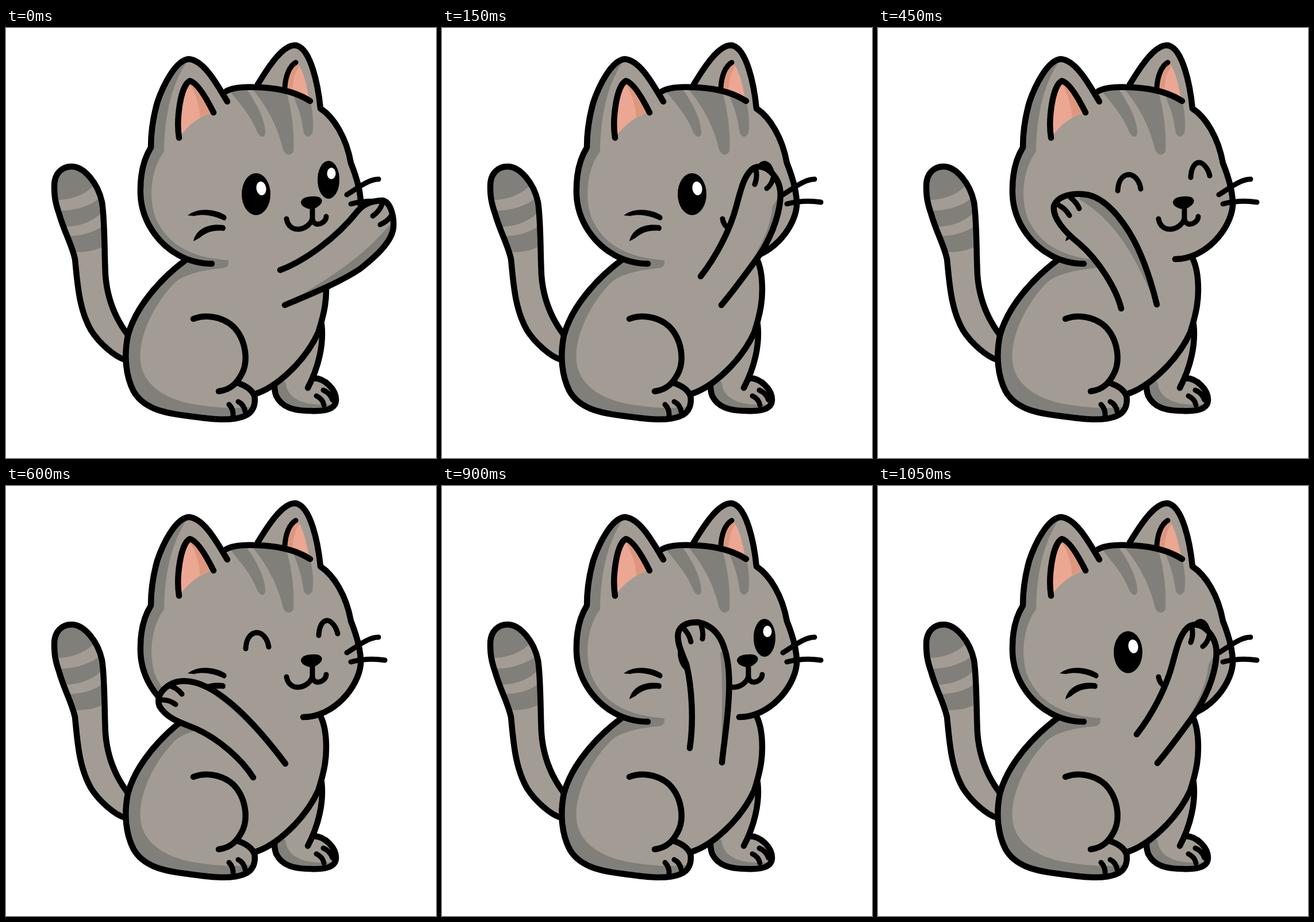
These frames come from a looping animation (748 px wide and 748 px high, 1200 ms). An HTML page:

```html
<!DOCTYPE html>
<html lang="en">
<head>
<meta charset="utf-8">
<title>Waving cat</title>
<style>
  html, body { margin: 0; width: 100%; height: 100%; overflow: hidden; background: #fff; }
  svg { display: block; width: 100%; height: 100%; }
  .fur { fill: #a39c94; }
  .dark { fill: #817f7a; }
  .pink { fill: #eca793; }
  .rose { fill: #de977f; }
  .ink { fill: #000; }
  .line { fill: none; stroke: #000; stroke-width: 10.5; stroke-linecap: round; stroke-linejoin: round; }
  .thin { stroke-width: 9; }
</style>
</head>
<body>
<svg viewBox="0 0 748 748">
  <defs>
    <path id="tail" d="M207,577C189,572 162,548 148,526C126,488 124,440 120,402C114,375 102,357 92,322C85,302 84,290 84,275C84,252 98,241 114,241C136,241 160,270 167,303C172,335 171,390 173,430C176,470 190,505 212,534"/>
    <path id="farLeg" d="M549,515C553,550 544,590 525,626L533,609C555,608 575,630 574,648C573,665 550,667 530,666C500,666 480,660 470,640C467,632 467,628 467,621"/>
    <path id="body" d="M312,404C270,435 225,485 212,535C205,570 208,605 222,632C238,660 270,669 310,674C345,679 390,686 415,675C430,669 435,655 432,637C470,626 520,580 543,530C556,490 557,470 557,455C557,430 553,412 547,400"/>
    <path id="head" d="M358,410C340,410 320,406 300,395C263,374 236,335 234,290C233,260 238,230 252,208C252,185 256,155 263,130C273,100 295,56 318,54C345,56 368,100 385,128L383,110C400,100 440,102 470,106C495,110 515,118 529,127L547,140C570,155 592,190 600,235C612,265 618,290 617,310C613,350 570,402 517,402"/>
    <clipPath id="inTail"><use href="#tail"/></clipPath>
    <clipPath id="inLeg"><use href="#farLeg"/></clipPath>
    <clipPath id="inBody"><use href="#body"/></clipPath>
    <clipPath id="inHead"><use href="#head"/></clipPath>
  </defs>

  <use href="#tail" class="fur"/>
  <g class="dark" clip-path="url(#inTail)">
    <path d="M70,230H180L153,273C140,290 110,300 88,299H70Z"/>
    <path d="M90,318C125,318 150,307 164,295L170,317C155,335 130,346 98,346Z"/>
    <path d="M104,362C140,362 160,352 174,339V377C160,386 140,392 112,389Z"/>
  </g>
  <use href="#tail" class="line"/>

  <use href="#farLeg" class="fur"/>
  <path class="dark" clip-path="url(#inLeg)" d="M486,615C489,645 515,660 580,654V680H450V615Z"/>
  <path class="line" d="M549,515C553,550 544,590 525,626M533,609C555,608 575,630 574,648C573,665 550,667 530,666C500,666 480,660 470,640C467,632 467,628 467,621"/>
  <path class="line thin" d="M540,640Q551,645 553,656M552,630Q564,635 568,647"/>

  <use href="#body" class="fur"/>
  <path class="dark" clip-path="url(#inBody)" d="M387,400V410Q386,417 375,418C335,422 305,430 290,447C250,490 230,545 234,580C238,620 275,646 330,655C370,661 405,664 440,657V700H190V400Z"/>
  <use href="#body" class="line"/>
  <path class="line" d="M326,506C345,498 375,501 395,519C418,542 422,580 410,602C402,617 392,629 370,632M402,617C417,622 428,629 432,640"/>
  <path class="line thin" d="M388,655Q396,663 395,676M404,650Q414,655 416,667"/>

  <path class="fur" d="M438,98C455,70 480,30 503,30C530,33 543,100 547,140L530,150L438,115Z"/>
  <path class="pink" d="M487,108C486,85 493,65 505,59C517,72 522,95 528,127Z"/>
  <path class="rose" d="M487,108C486,85 493,65 505,59L510,67C501,80 498,95 499,112Z"/>
  <use href="#head" class="fur"/>
  <g class="dark" clip-path="url(#inHead)">
    <path d="M320,50C292,90 276,140 275,215C248,250 248,310 264,338C284,378 325,400 387,404V430H200V40Z"/>
    <path d="M388,108C405,130 425,150 438,183Q447,195 451,184C452,165 440,135 414,100Z"/>
    <path d="M423,100C445,125 470,160 482,212Q490,227 500,215C503,180 495,130 485,104Z"/>
    <path d="M495,106C510,140 515,160 518,183Q525,195 533,183C536,165 533,140 528,122Z"/>
  </g>
  <path class="pink" d="M301,191C296,160 303,100 320,92C333,95 350,125 361,147C340,152 320,165 301,191Z"/>
  <path class="rose" d="M317,94C333,92 350,125 361,147Q350,149 338,156C336,130 328,110 317,94Z"/>
  <path class="line" d="M358,410C340,410 320,406 300,395C263,374 236,335 234,290C233,260 238,230 252,208C252,185 256,155 263,130C273,100 295,56 318,54C345,56 368,100 385,128M383,110C400,100 440,102 470,106C495,110 515,118 529,127M438,98C455,70 480,30 503,30C530,33 543,100 547,140C570,155 592,190 600,235C612,265 618,290 617,310C613,350 570,402 517,402M301,191C296,160 303,100 320,92C333,95 350,125 361,147"/>
  <path class="line thin" d="M485,104C486,84 493,66 504,60M593,290C610,280 630,263 648,263M600,306C620,301 640,300 659,303"/>

  <path class="ink" d="M316,326C335,311 365,315 382,326Q386,332 380,335C360,326 345,323 327,327ZM326,371C330,350 352,339 379,343Q385,348 379,353C358,351 347,357 337,365Z"/>
  <path class="ink" d="M513,303C514,295 525,293 533,293C545,292 552,297 549,304C545,311 535,316 529,315C521,314 513,309 513,303Z"/>
  <path class="line thin" d="M488,332C490,345 500,351 509,350C523,349 532,338 533,330V312M533,330C533,340 540,343 548,340C554,337 557,333 557,328"/>

  <g id="openEyes">
    <ellipse cx="435" cy="289" rx="25" ry="36.5"/>
    <ellipse cx="561" cy="264" rx="19" ry="33"/>
    <g fill="#fff">
      <ellipse cx="444" cy="279" rx="8.5" ry="12" transform="rotate(-10 444 279)"/>
      <ellipse cx="566" cy="253" rx="7.5" ry="10"/>
    </g>
  </g>
  <path id="closedEyes" class="line thin" d="M417,283C418,262 428,255 437,255C447,256 455,266 457,280M544,260C545,240 553,233 560,234C568,236 575,247 577,257"/>

  <path id="armFill" class="fur"/>
  <path id="armShade" class="dark"/>
  <path id="armLine" class="line"/>
  <path id="toes" class="line thin"/>
</svg>
<script>
  const STEP = 150;

  // Arm positions from fully extended to tucked beside the cheek.
  const arms = [
    {
      outline: "M477,421C520,405 575,365 612,318C625,303 640,301 655,300C668,302 675,325 674,345C673,372 640,400 616,419C580,443 530,463 485,482",
      shade: "M485,482C550,441 612,408 667,343L674,345C673,372 640,400 616,419C580,443 530,463 485,482Z",
      toes: "M655,304Q651,318 638,327M670,327Q664,336 651,342"
    },
    {
      outline: "M450,432C475,400 500,355 512,310C520,280 525,258 540,245C552,237 568,242 580,260C590,275 590,290 587,310C580,350 560,385 545,405C525,432 505,460 486,482",
      shade: "M486,482C522,430 570,370 575,310L588,290C590,340 560,385 545,405C525,432 505,460 486,482Z",
      toes: "M546,246Q549,260 544,272M576,261Q573,273 565,279"
    },
    {
      outline: "M431,456C438,410 435,350 425,310C415,285 408,270 411,255C415,240 430,237 445,237C470,242 485,260 492,285C500,310 500,345 499,365C497,410 490,450 487,481",
      shade: "M487,481C484,430 491,360 484,290L492,285C500,310 500,345 499,365C497,410 490,450 487,481Z",
      toes: "M418,246Q430,256 433,271M451,243Q455,255 453,266"
    },
    {
      outline: "M423,488C415,455 385,405 350,375C325,355 303,330 306,310C312,292 335,288 355,289C388,290 415,320 437,355C459,391 475,440 485,481",
      shade: "M485,481C456,425 429,345 350,298L355,289C388,290 415,320 437,355C459,391 475,440 485,481Z",
      toes: "M314,308Q326,314 333,326M335,295Q346,304 350,314"
    },
    {
      outline: "M430,507C410,475 370,440 330,422C305,412 280,405 267,383C260,365 275,350 290,343C310,335 330,340 350,350C400,375 450,435 486,483",
      shade: "M486,483C448,447 420,406 365,366L375,366C415,390 450,435 486,483Z",
      toes: "M282,347Q297,350 306,362M268,372Q284,371 295,380"
    }
  ];
  const swing = [0, 1, 2, 3, 4, 3, 2, 1];

  const byId = id => document.getElementById(id);
  const setPath = (id, d) => byId(id).setAttribute("d", d);
  const show = (id, visible) => byId(id).style.display = visible ? "" : "none";

  function draw(time) {
    const step = Math.floor(time / STEP) % swing.length;
    const arm = arms[swing[step]];
    const smiling = step === 3 || step === 4;
    setPath("armFill", arm.outline);
    setPath("armShade", arm.shade);
    setPath("armLine", arm.outline);
    setPath("toes", arm.toes);
    show("openEyes", !smiling);
    show("closedEyes", smiling);
  }

  let start;
  function tick(now) {
    start ??= now;
    draw(now - start);
    requestAnimationFrame(tick);
  }
  draw(0);
  requestAnimationFrame(tick);
</script>
</body>
</html>
```
